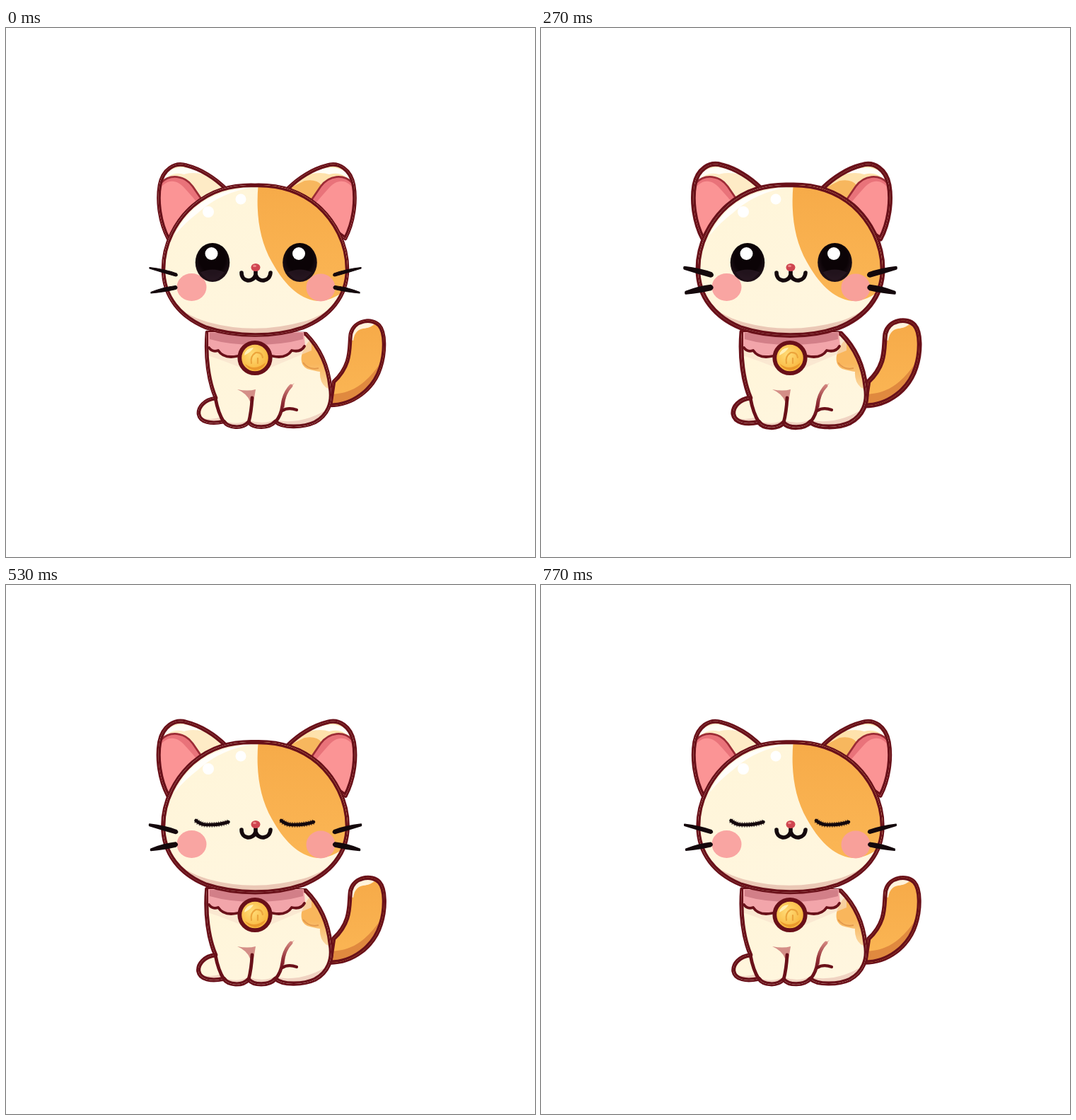
Recreate the animation shown at these times as an HTML page. Size 748x748 px, loop 800 ms.

```html
<!DOCTYPE html>
<html lang="en">
<head>
<meta charset="utf-8">
<title>Blinking cat</title>
<style>
html, body { margin: 0; width: 100%; height: 100%; overflow: hidden; background: #fff; }
svg { display: block; width: 100vw; height: 100vh; }
.ln { fill: none; stroke: #691019; stroke-linecap: round; stroke-linejoin: round; }
.rim { stroke-width: var(--rim); }
.edge { stroke-width: 6.6; }
.ink { fill: none; stroke: #14080c; stroke-linecap: round; stroke-linejoin: round; }
.hairs { fill: #14080c; stroke: #14080c; stroke-width: var(--hair); stroke-linejoin: round; }
</style>
</head>
<body>
<svg viewBox="0 0 748 748" xmlns="http://www.w3.org/2000/svg">
<defs>
  <path id="head" d="M352 222C318 221 290 229 264 251C240 272 222 305 222 341C222 380 246 409 283 424C325 438 380 438 420 424C458 409 483 380 483 341C483 305 465 272 441 251C415 229 386 221 352 222Z"/>
  <path id="ear" d="M229 298C217 275 213 245 217 222C221 200 238 188 256 194C276 199 296 212 310 226L280 262Z"/>
  <path id="body" d="M284 430C281 465 286 500 296 523C280 525 271 536 272 546C274 558 290 561 308 557C314 566 334 568 343 558C350 567 372 567 381 557C390 566 420 566 437 558C455 548 463 530 459 508C456 478 444 452 424 432Z"/>
  <path id="tail" d="M458 534C490 534 520 512 530 480C537 458 537 430 528 420C518 409 492 412 487 432C484 450 490 475 463 500Z"/>
  <clipPath id="inHead"><use href="#head"/></clipPath>
  <clipPath id="inEar"><use href="#ear"/></clipPath>
  <clipPath id="inBody"><use href="#body"/></clipPath>
  <clipPath id="inTail"><use href="#tail"/></clipPath>
  <linearGradient id="cream" x1="0" y1="0" x2=".7" y2="1">
    <stop offset="0" stop-color="#fff5d8"/><stop offset="1" stop-color="#fff6df"/>
  </linearGradient>
  <linearGradient id="gold" x1="0" y1="0" x2="0" y2="1">
    <stop offset="0" stop-color="#f6aa48"/><stop offset="1" stop-color="#fbb655"/>
  </linearGradient>
  <linearGradient id="patch" x1="0" y1="0" x2="0" y2="1">
    <stop offset=".5" stop-color="#f9b65c"/><stop offset="1" stop-color="#fbd9a4"/>
  </linearGradient>
  <linearGradient id="fold" gradientUnits="userSpaceOnUse" x1="0" y1="503" x2="0" y2="550">
    <stop offset="0" stop-color="#d98d85"/><stop offset=".6" stop-color="#8a2730"/><stop offset="1" stop-color="#691019"/>
  </linearGradient>
  <radialGradient id="eyeFill" cx=".5" cy=".4" r=".62">
    <stop offset=".6" stop-color="#0b0306"/><stop offset="1" stop-color="#24141d"/>
  </radialGradient>
  <radialGradient id="bellFill" cx=".42" cy=".4" r=".62">
    <stop offset="0" stop-color="#ffdc78"/><stop offset="1" stop-color="#f8b034"/>
  </radialGradient>
  <g id="pinna">
    <path d="M219 218C232 207 251 209 263 223L278 245L228 301C217 277 213 246 219 218Z" fill="#e9737a"/>
    <path d="M228 301C217 277 214 246 218 227C229 212 243 215 253 227Q264 239 272 249Z" fill="#fb9495"/>
    <path d="M219 219C232 206 252 208 264 224L277 243" fill="none" stroke="#9c2c36" stroke-width="2.8"/>
  </g>
  <g id="whiskers">
    <path d="M203 338.5Q225 341 241 347Q244 350 240 351Q222 346 203 340Z"/>
    <path d="M205 373.500Q224 366 240 364.500Q244 367 240 369.500Q224 373 205 375Z"/>
  </g>
  <g id="eye">
    <ellipse rx="24.3" ry="27.6" fill="url(#eyeFill)"/>
    <path d="M-17 14Q0 6 17 14Q8 25 0 25Q-9 25-17 14Z" fill="#2b1a25" opacity=".7"/>
    <circle cx="-1.5" cy="-12.5" r="9" fill="#fff"/>
  </g>
  <g id="lid" class="ink">
    <path d="M-23 0Q-17 5.500-8 6Q10 6.500 23 2" stroke-width="4.6"/>
    <path d="M-23 0Q-17 5.500-8 6Q10 6.500 23 2" stroke-width="7.5" stroke-dasharray="1.5 1.8" stroke-linecap="butt" opacity=".6"/>
  </g>
</defs>

<use href="#tail" class="ln rim"/>
<use href="#tail" fill="url(#gold)"/>
<g clip-path="url(#inTail)">
  <path d="M455 518C490 518 508 503 528 476L535 500L470 545Z" fill="#e0893f"/>
  <path d="M485 440C487 420 502 414 522 418Q516 424 505 425Q493 427 491 442Z" fill="#fff3dc"/>
  <use href="#tail" class="ln edge"/>
</g>

<use href="#body" class="ln rim"/>
<use href="#body" fill="url(#cream)"/>
<g clip-path="url(#inBody)">
  <path d="M428 443C415 460 414 476 426 482Q437 485 444 486Q443 500 452 508Q458 512 464 509V440Z" fill="url(#patch)"/>
  <path d="M420 473Q428 484 442 481" fill="none" stroke="#e49a4c" stroke-width="2"/>
  <path d="M270 548Q286 557 304 550L309 562H270ZM307 555Q326 563 344 554V570H307ZM345 555Q364 562 382 553V570H345ZM384 555Q422 561 459 536V570H384Z" fill="#f0d3c2"/>
  <path d="M282 462Q325 476 352 490Q388 474 432 456V432H282Z" fill="#f7dfcb" opacity=".6"/>
  <path d="M327 511Q342 514 353 511L350 529L345 528Q341 517 327 511Z" fill="#d48e87"/>
  <path d="M408 502Q391 511 389 532L394 537Q394 515 408 502Z" fill="#d58b83"/>
  <use href="#body" class="ln edge"/>
</g>
<g class="ln" stroke-width="4.8">
  <path d="M296 523Q300 545 308 557"/>
  <path d="M348 523Q347 543 343 558"/>
  <path d="M403 506Q393 516 391 533Q389 548 381 557" stroke="url(#fold)"/>
  <path d="M411 540Q399 536 391 541" stroke-width="4.2"/>
</g>

<path d="M286 430H421L423 449Q417 459 404 456Q396 468 377 464H327Q308 468 300 456Q290 459 286 450Z" fill="#f2a5aa"/>
<path d="M287 452Q292 459 300 456Q308 468 327 464M377 464Q396 468 404 456Q417 459 422 450" class="ln" stroke-width="3.8"/>
<path d="M288 431H420V440Q390 448 352 448Q316 448 288 440Z" fill="#d27f88"/>
<circle cx="352" cy="466.500" r="21.700" fill="url(#bellFill)" stroke="#691019" stroke-width="5.800"/>
<path d="M338 475Q352 486 367 473Q365 482 352 484Q341 482 338 475Z" fill="#eb992d"/>
<path d="M337 463Q338 453 350 452Q347 458 337 463Z" fill="#fff0b6"/>
<path d="M347 474Q345 464 353 459Q362 458 363 466M356 474V467" fill="none" stroke="#eca53c" stroke-width="2.2" stroke-linecap="round"/>

<g>
  <use href="#ear" class="ln rim"/>
  <use href="#ear" fill="#feebc6"/>
  <g clip-path="url(#inEar)">
    <path d="M217 218C230 192 256 193 282 207Q263 203 252 207Q232 201 217 222Z" fill="#fffdf5"/>
    <use href="#pinna"/>
    <use href="#ear" class="ln edge"/>
  </g>
</g>
<g transform="matrix(-1 0 0 1 709 0)">
  <use href="#ear" class="ln rim"/>
  <use href="#ear" fill="#fee2ac"/>
  <g clip-path="url(#inEar)">
    <path d="M263 222Q270 213 287 216L315 230L280 254Z" fill="#f7b75e"/>
    <path d="M217 218C230 192 256 193 282 207Q263 203 252 207Q232 201 217 222Z" fill="#fffdf5"/>
    <use href="#pinna"/>
    <use href="#ear" class="ln edge"/>
  </g>
</g>

<use href="#head" class="ln rim"/>
<use href="#head" fill="#ebc8b6"/>
<g clip-path="url(#inHead)">
  <path d="M215 340C219 385 252 406 286 416Q352 434 421 415C455 405 483 383 490 338V210H215Z" fill="url(#cream)"/>
  <path d="M357 218C353 258 357 298 376 331C392 360 413 383 440 386Q464 387 490 362V210Z" fill="url(#gold)"/>
  <path d="M238 294C258 252 292 229 350 225Q302 233 272 261Q252 276 238 294Z" fill="#fffefa"/>
  <circle cx="286" cy="260" r="8" fill="#fff"/>
  <circle cx="332" cy="242" r="7.500" fill="#fff"/>
  <use href="#head" class="ln edge"/>
</g>

<ellipse cx="262.500" cy="366.500" rx="21" ry="19.500" fill="#f9a5a2"/>
<ellipse cx="445" cy="367" rx="20.500" ry="19.500" fill="#f8a09a"/>
<g class="hairs">
  <use href="#whiskers"/><use href="#whiskers" transform="matrix(-1 0 0 1 705 0)"/>
</g>
<path class="ink" d="M353 342V349M333 346C333 359 349 361 353 349C357 361 373 359 374 346" stroke-width="5.600"/>
<ellipse cx="353" cy="338.500" rx="6.500" ry="5.500" fill="#cf4550"/>
<ellipse cx="351.500" cy="336.500" rx="2.500" ry="1.500" fill="#ee8a8a"/>

<g id="open"><use href="#eye" x="292" y="331.500"/><use href="#eye" x="415.500" y="331.500"/></g>
<g id="shut"><use href="#lid" x="291.500" y="333"/><use href="#lid" x="412" y="333"/></g>
</svg>

<script>
const LOOP = 800, STEPS = 24, BLINK = 12;
// [step, how far the outline reaches outward]
const reach = [[0, 2.3], [1, 3.3], [3, 3.8], [8, 3.5], [11, 3.3], [12, 3.1], [16, 2.9], [20, 3.1], [23, 2.7]];
const svg = document.querySelector('svg');
const open = document.getElementById('open'), shut = document.getElementById('shut');

function reachAt(step) {
  const i = reach.findIndex(k => k[0] >= step);
  if (i < 1) return reach[0][1];
  const [a, x] = reach[i - 1], [b, y] = reach[i];
  return x + (y - x) * (step - a) / (b - a);
}

const start = performance.now();
function draw(now) {
  const t = Math.max(0, now - start) % LOOP;
  const step = Math.floor((t + 4) * STEPS / LOOP) % STEPS;
  const r = reachAt(step);
  svg.style.setProperty('--rim', 2 * r + 'px');
  svg.style.setProperty('--hair', 2 * (r - 1.7) + 'px');
  open.style.display = step < BLINK ? '' : 'none';
  shut.style.display = step < BLINK ? 'none' : '';
  requestAnimationFrame(draw);
}
draw(start);
</script>
</body>
</html>
```
